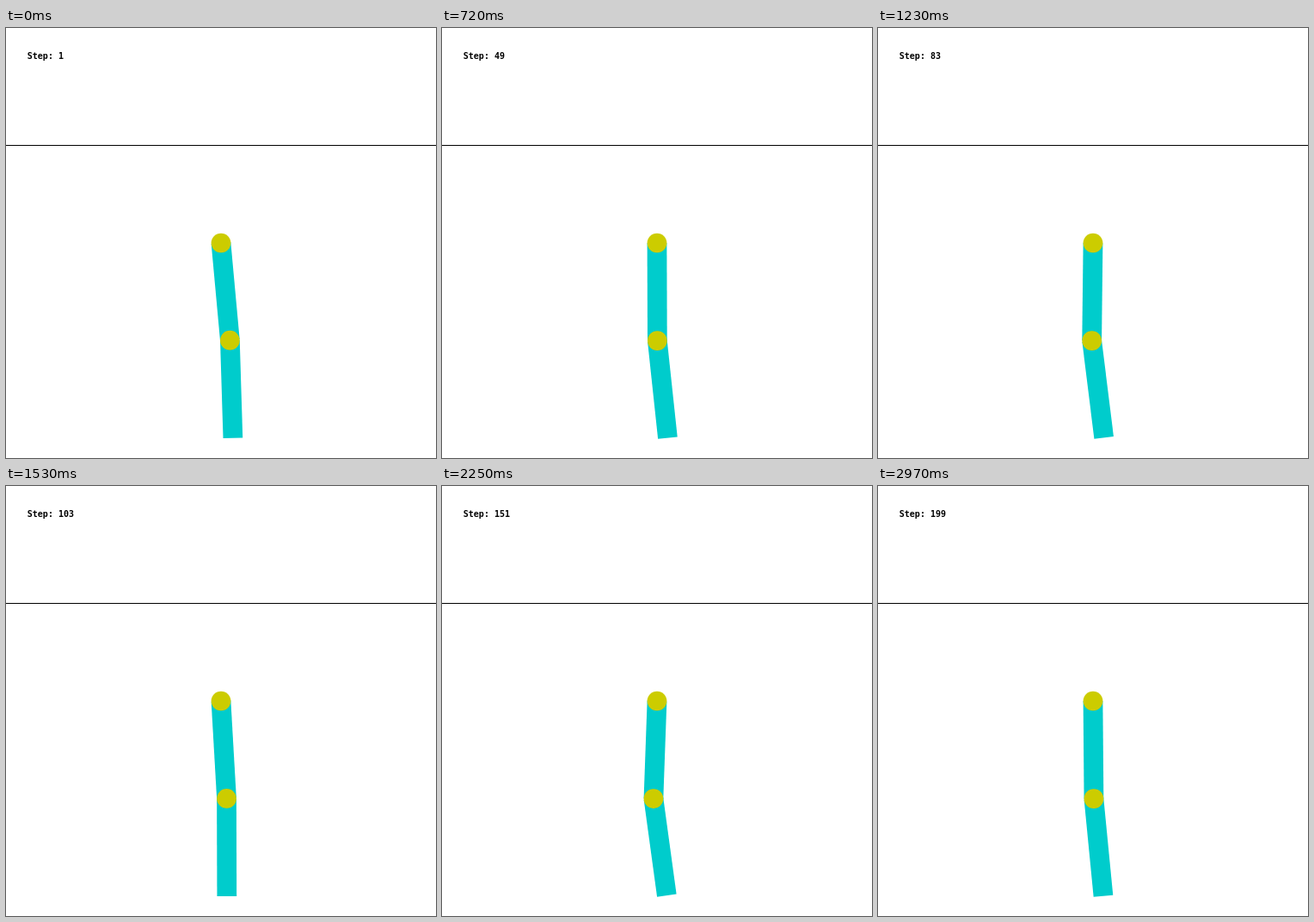
Animation, 500 px wide and 500 px high, one loop 3 s. Source, as an HTML page with a canvas:

```html
<!DOCTYPE html>
<html lang="en">
<head>
<meta charset="utf-8">
<title>Acrobot</title>
<style>
  html, body { margin: 0; width: 100%; height: 100%; overflow: hidden; background: #fff; }
  canvas { display: block; }
</style>
</head>
<body>
<canvas id="stage" width="500" height="500"></canvas>
<script>
const ctx = document.getElementById('stage').getContext('2d');
const FRAME = 30, COUNT = 100, DT = 0.2;
const UNIT = 500 / 4.4, HALF = UNIT * 0.1;
const { sin, cos } = Math;

// Double pendulum without torque: [angle1, relative angle2, speed1, speed2]
function slope([a, b, va, vb]) {
  const d1 = 3.5 + cos(b), d2 = 1.25 + 0.5 * cos(b);
  const phi2 = 4.9 * sin(a + b);
  const phi1 = -(0.5 * vb + va) * vb * sin(b) + 14.7 * sin(a) + phi2;
  const accB = (d2 / d1 * phi1 - 0.5 * va * va * sin(b) - phi2) / (1.25 - d2 * d2 / d1);
  return [va, vb, -(d2 * accB + phi1) / d1, accB];
}

const add = (s, k, h) => s.map((v, i) => v + k[i] * h);

// One Runge-Kutta step
function advance(s) {
  const k1 = slope(s);
  const k2 = slope(add(s, k1, DT / 2));
  const k3 = slope(add(s, k2, DT / 2));
  const k4 = slope(add(s, k3, DT));
  return s.map((v, i) => v + DT / 6 * (k1[i] + 2 * k2[i] + 2 * k3[i] + k4[i]));
}

const poses = [];
let state = [0.0915, -0.0608, -0.0267, -0.0488];
for (let i = 0; i < COUNT; i++) {
  poses.push(state);
  state = advance(advance(state));
}

function link(x, y, angle) {
  ctx.save();
  ctx.translate(x, y);
  ctx.rotate(-angle);
  ctx.fillStyle = '#00cccc';
  ctx.fillRect(-HALF, 0, HALF * 2, UNIT);
  ctx.restore();
  ctx.fillStyle = '#cccc00';
  ctx.beginPath();
  ctx.arc(x, y, HALF, 0, Math.PI * 2);
  ctx.fill();
}

function draw(i) {
  const [a, b] = poses[i];
  ctx.fillStyle = '#fff';
  ctx.fillRect(0, 0, 500, 500);
  ctx.fillStyle = '#000';
  ctx.fillRect(0, 136, 500, 1);
  link(250, 250, a);
  link(250 + UNIT * sin(a), 250 + UNIT * cos(a), a + b);
  ctx.fillStyle = '#000';
  ctx.font = 'bold 10px "DejaVu Sans Mono", "Liberation Mono", monospace';
  ctx.fillText('Step: ' + (2 * i + 1), 24.8, 36);
}

const start = performance.now();
function tick() {
  draw(Math.floor((performance.now() - start) / FRAME) % COUNT);
  requestAnimationFrame(tick);
}
tick();
</script>
</body>
</html>
```
